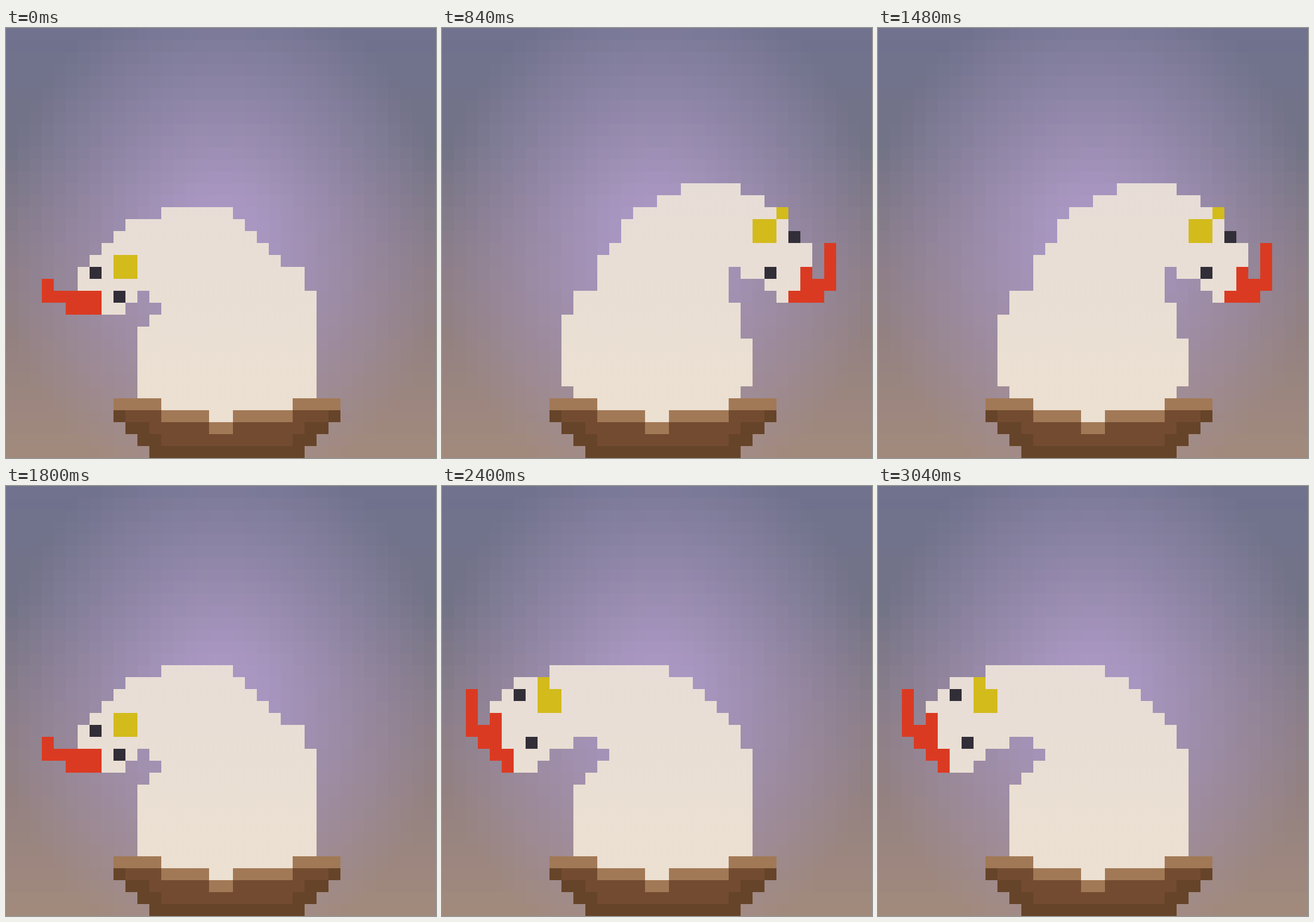
An HTML page with a canvas that plays this animation: 720x720 px, repeating every 3.08 s.

```html
<!DOCTYPE html>
<html lang="en">
<head>
<meta charset="utf-8">
<title>Headbanging hen</title>
<style>
html, body { margin: 0; width: 100%; height: 100%; overflow: hidden; background: #85798a; }
canvas { display: block; width: 720px; height: 720px; }
</style>
</head>
<body>
<canvas id="stage" width="720" height="720"></canvas>
<script>
const GRID = 36, CELL = 20, STEP = 40, LOOP = 3080;
const RED = '#da3a22', YELLOW = '#d3bb1c', INK = '#312e38';
const WOOD = { light: '#a27956', mid: '#734b30', dark: '#664429' };

const ctx = document.getElementById('stage').getContext('2d');
ctx.scale(CELL, CELL);

const clamp = (v, a = 0, b = 1) => Math.min(b, Math.max(a, v));
const mix = (a, b, p) => a + (b - a) * p;
const smooth = (a, b, v) => { const p = clamp((v - a) / (b - a)); return p * p * (3 - 2 * p); };
const mixColor = (a, b, p) => a.map((v, i) => mix(v, b[i], p));
const rgb = c => `rgb(${c.map(Math.round)})`;

const plumage = ctx.createLinearGradient(0, 13, 0, 33);
plumage.addColorStop(0, 'rgb(231,221,215)');
plumage.addColorStop(1, 'rgb(236,224,209)');

function box(color, x, y, w = 1, h = 1) {
  ctx.fillStyle = color;
  ctx.fillRect(x, y, w, h);
}

// Backdrop: vertical dusk gradient with a violet glow, one flat colour per cell.
const dusk = [
  [0, [112, 114, 142]],
  [10, [115, 115, 135]],
  [20, [139, 125, 133]],
  [36, [162, 138, 124]]
];
const GLOW = [169, 151, 194];

function duskAt(y) {
  const i = Math.max(1, dusk.findIndex(s => s[0] >= y));
  const [y0, a] = dusk[i - 1], [y1, b] = dusk[i];
  return mixColor(a, b, (y - y0) / (y1 - y0));
}

const backdrop = document.createElement('canvas');
backdrop.width = backdrop.height = GRID;
const back = backdrop.getContext('2d');
for (let y = 0; y < GRID; y++) {
  for (let x = 0; x < GRID; x++) {
    const d = Math.hypot((x - 17.5) * 1.15, y - 17.5);
    back.fillStyle = rgb(mixColor(duskAt(y + 0.5), GLOW, clamp(1.2 * (1 - d / 21.5))));
    back.fillRect(x, y, 1, 1);
  }
}

// Drawn key poses of the swing.
const pose = (body, comb, eyes, beak) =>
  ({ body: new Path2D(body), comb: new Path2D(comb), eyes, beak: new Path2D(beak) });

const leftLow = pose(
  'M13 15H19V16H20V17H21V18H22V19H23V20H25V22H26V31H11V25H12V24H13V23H12V22H11V23H10V24H6V20H7V19H8V18H9V17H10V16H13Z',
  'M3 21H4V22H8V24H5V23H3Z',
  [[7, 20], [9, 22]],
  'M9 19H11V21H9Z');

const leftOut = pose(
  'M9 15H19V16H21V17H22V18H23V19H24V20H25V22H26V31H11V25H12V24H13V23H14V22H13V21H11V22H9V23H8V24H5V19H4V18H5V17H6V16H9Z',
  'M2 17H3V20H4V19H5V22H6V24H5V23H4V22H3V21H2Z',
  [[6, 17], [7, 21]],
  'M8 16H9V17H10V19H8Z');

const rightLow = pose(
  'M20 13H25V14H27V15H29V18H31V22H29V23H28V22H27V21H25V20H24V23H25V26H26V30H25V31H11V30H10V24H11V22H13V19H14V18H15V16H16V15H18V14H20Z',
  'M30 20H31V21H32V18H33V22H32V23H29V22H30Z',
  [[29, 17], [27, 20]],
  'M28 15H29V16H28V18H26V16H28Z');

function drawPose(p) {
  ctx.fillStyle = plumage;
  ctx.fill(p.body);
  ctx.fillStyle = RED;
  ctx.fill(p.comb);
  ctx.fillStyle = YELLOW;
  ctx.fill(p.beak);
  p.eyes.forEach(([x, y]) => box(INK, x, y));
}

function fillCells(color, bottom, inside) {
  for (let y = 0; y < bottom; y++)
    for (let x = 0; x < GRID; x++)
      if (inside(x + 0.5, y + 0.5)) box(color, x, y);
}

// In-between poses: a tapered neck bent by `bend` degrees, with a head on its tip.
function drawBent(bend, length) {
  const N = 60, spine = [];
  let x = 18.4, y = 31, angle = 0;
  for (let i = 0; i <= N; i++) {
    const s = i / N;
    spine.push([x, y, 7.6 - 3.6 * smooth(0.2, 0.85, s)]);
    angle = bend * Math.PI / 180 * smooth(0.25, 0.8, s);
    x += Math.sin(angle) * length / N;
    y -= Math.cos(angle) * length / N;
  }
  fillCells(plumage, 31, (px, py) => spine.some(([sx, sy, r]) => Math.hypot(px - sx, py - sy) < r));

  const ux = Math.sin(angle), uy = -Math.cos(angle);
  const turn = clamp(-bend / 90, -1, 1);
  const at = (u, v) => [x + ux * u - uy * v, y + uy * u + ux * v];
  fillCells(RED, GRID, (px, py) => {
    const dx = px - x, dy = py - y;
    const u = dx * ux + dy * uy, v = dy * ux - dx * uy;
    const ridge = Math.hypot(u - 3.6, v - clamp(v, -1.7, 1.7)) < 0.8;
    const spike = Math.hypot(u - clamp(u, 3.6, 5.6), v - 2 * turn) < 0.65;
    return ridge || spike;
  });
  const [bx, by] = at(-1.5, 2.2 * turn);
  box(YELLOW, Math.round(bx - 1), Math.round(by - 1), 2, 2);
  for (const side of [-2, 2]) {
    const [ex, ey] = at(0.5, side + 0.5 * turn);
    box(INK, Math.floor(ex), Math.floor(ey));
  }
}

function drawHen(t) {
  if (t < STEP) return drawPose(leftLow);
  if (t < 560) {
    const p = Math.sin(Math.PI / 2 * t / 560);
    return drawBent(mix(-135, 0, p), mix(22, 24, p));
  }
  if (t < 840) {
    const p = (1 - Math.cos(Math.PI * (t - 560) / 280)) / 2;
    return drawBent(130 * p, mix(24, 22, p));
  }
  const beat = Math.round((t - 520) / STEP) % 16;
  const key = { 0: leftLow, 8: rightLow, 15: leftOut }[beat];
  if (key) drawPose(key);
  else drawBent(-130 * Math.cos(Math.PI * beat / 8), 22);
}

function drawNest() {
  box(plumage, 13, 31, 11, 1);
  for (let i = 0; i < 4; i++) {
    box(WOOD.dark, 9 + i, 32 + i, 19 - 2 * i);
    if (i < 3) {
      const inset = i ? 2 : 1;
      box(WOOD.mid, 9 + i + inset, 32 + i, 19 - 2 * (i + inset));
    }
  }
  box(WOOD.light, 9, 31, 4);
  box(WOOD.light, 24, 31, 4);
  box(WOOD.light, 13, 32, 11);
  box(plumage, 17, 32, 2);
  box(WOOD.light, 17, 33, 2);
}

function draw(time) {
  const t = Math.floor((time % LOOP) / STEP) * STEP;
  ctx.imageSmoothingEnabled = false;
  ctx.drawImage(backdrop, 0, 0, GRID, GRID);
  drawHen(t);
  drawNest();
}

const start = performance.now();
function tick() {
  draw(performance.now() - start);
  requestAnimationFrame(tick);
}
tick();
</script>
</body>
</html>
```
